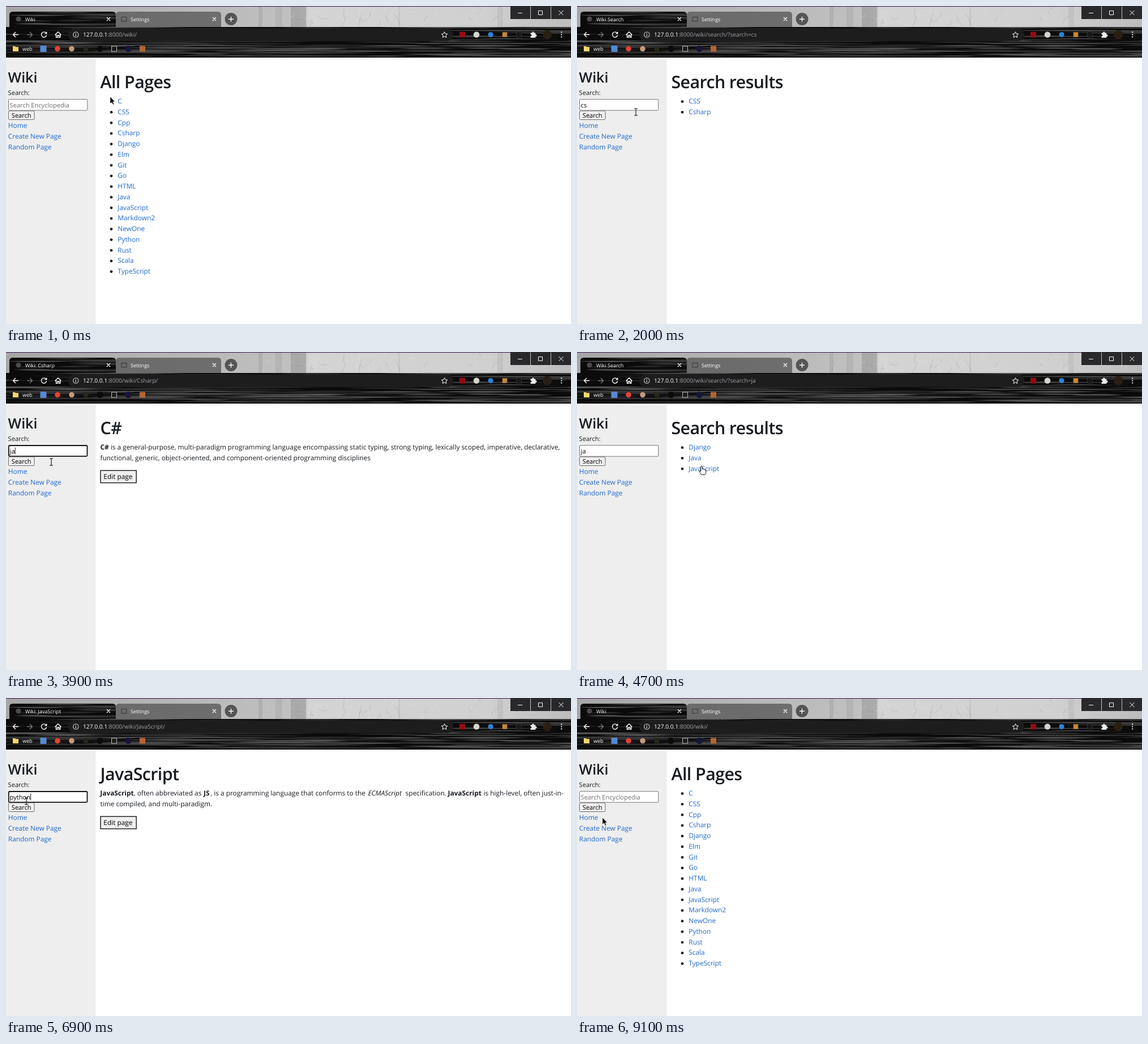
Write an HTML page that moves like this. It is 998 px wide and 561 px high and loops after 9200 ms.

```html
<!DOCTYPE html>
<html lang="en">
<head>
<meta charset="utf-8">
<title>Wiki</title>
<style>
  html, body { margin: 0; width: 100%; height: 100%; overflow: hidden; background: #fff; }
  svg { display: block; }
  text { font-family: "Open Sans", "Noto Sans", sans-serif; font-size: 11.88px; fill: #171b20; white-space: pre; text-rendering: geometricPrecision; }
  .h1 { font-size: 30.4px; font-weight: 600; letter-spacing: -.6px; }
  .h2 { font-size: 25px; font-weight: 600; }
  .small { font-size: 11.1px; }
  .tab { font-size: 9px; fill: #fff; }
  .url { font-size: 10.2px; fill: #9da0a4; }
  .link { fill: #1f68d0; }
  .b { font-weight: 700; }
  .i { font-style: italic; }
  .line { fill: none; stroke: #fff; stroke-width: 1.4; }
</style>
</head>
<body>
<svg id="stage" width="998" height="561" viewBox="0 0 998 561">
  <defs>
    <linearGradient id="fog">
      <stop offset="0" stop-color="#a6a6a6"/>
      <stop offset=".37" stop-color="#bababa"/>
      <stop offset=".5" stop-color="#c0c0c0"/>
      <stop offset=".53" stop-color="#c4c4c4"/>
      <stop offset=".535" stop-color="#d4d4d4"/>
      <stop offset=".85" stop-color="#d0d0d0"/>
      <stop offset="1" stop-color="#bcbcbc"/>
    </linearGradient>
    <clipPath id="dark"><path d="M0 37H6V16Q6 10 12 10H188Q194 10 194 16V37H998V91H0Z"/></clipPath>
    <clipPath id="strip"><rect width="998" height="37"/></clipPath>
  </defs>

  <rect width="998" height="561" fill="#fff"/>
  <rect y="94" width="158.5" height="467" fill="#eee"/>

  <rect width="998" height="37" fill="url(#fog)"/>
  <g id="trees" clip-path="url(#strip)"></g>
  <rect width="998" height="1.2" fill="#50305f"/>
  <path d="M194 37V16Q194 10 200 10H374Q380 10 380 16V37Z" fill="#4a4a4a" opacity=".68"/>
  <g clip-path="url(#dark)">
    <rect width="998" height="91" fill="#0b0b0b"/>
    <g id="grain"></g>
    <rect y="89.5" width="998" height="1.5" fill="#050505"/>
  </g>
  <rect x="110" y="39.5" width="680" height="22.5" rx="11.2" fill="#1d1d1e"/>

  <circle cx="22" cy="23" r="4.6" fill="#4a4a4a"/>
  <rect x="204" y="19.5" width="9" height="7.5" fill="none" stroke="#383838"/>
  <text id="title" class="tab" x="34" y="26.6"></text>
  <text class="tab" x="220" y="26.6">Settings</text>
  <path class="line" d="M178 20l6 6m0-6l-6 6M365 20l6 6m0-6l-6 6"/>
  <circle cx="397.5" cy="23" r="11" fill="#555"/>
  <path class="line" d="M393 23.2h9M397.5 18.7v9"/>

  <g id="winButtons"></g>
  <path class="line" d="M904 12.5h8M940.5 8.5h7v7h-7ZM976.5 8l8 8m0-8l-8 8" style="stroke-width:1"/>

  <path class="line" d="M22 50.5H13M17 46l-4.5 4.5L17 55"/>
  <path class="line" d="M37 50.5h9M42 46l4.5 4.5L42 55" style="stroke:#777"/>
  <path class="line" d="M71 48A4.6 4.6 0 1 0 71.6 51.5M71.7 45.5V48.6H68.5"/>
  <path class="line" d="M86.5 51L92 45.8 97.5 51M88.500 50V55.3H91V51.7H93.5V55.3H95.7V50"/>
  <circle cx="123.3" cy="50.5" r="4.7" class="line" style="stroke-width:1.1;stroke:#ccc"/>
  <path class="line" d="M123.3 49.8v3.4M123.3 47.6v1.2" style="stroke:#ccc"/>
  <text class="url" x="136" y="54.3"><tspan fill="#fff">127.0.0.1</tspan><tspan id="path"></tspan></text>
  <path class="line" d="M774.5 45.5l1.6 3.4 3.7.4-2.8 2.5.8 3.7-3.3-1.9-3.3 1.9.8-3.7-2.8-2.5 3.7-.4Z" style="stroke-width:1"/>
  <g id="icons"></g>
  <path d="M926.5 47.5h2.8a1.7 1.7 0 1 1 3.2 0h2.8v2.9a1.7 1.7 0 1 1 0 3.2v2.4h-8.8v-2.8a1.5 1.5 0 1 0 0-2.9Z" fill="#eee"/>
  <path d="M980.2 45.2h2v2h-2Zm0 4.2h2v2h-2Zm0 4.2h2v2h-2Z" fill="#eee"/>
  <path d="M12 71h4l1 1.200h5V80H12Z" fill="#f5d76c"/>
  <text class="tab" x="29" y="78.8">web</text>

  <text class="h2" x="3.5" y="135">Wiki</text>
  <text class="small" x="3.6" y="156.5">Search:</text>
  <rect id="box" rx="1.5" fill="#fff"/>
  <text id="query" class="small" x="6.6" y="178.7"></text>
  <path id="caret" d="M0 168.5v12" stroke="#000" stroke-width=".9"/>
  <rect x="4.4" y="185" width="45.6" height="15.5" rx="2" fill="#efefef" stroke="#6b6b6b"/>
  <text class="small" x="9.8" y="197" style="fill:#000">Search</text>
  <text class="link" x="3.8" y="215.1">Home</text>
  <text class="link" x="3.8" y="233.9">Create New Page</text>
  <text class="link" x="3.8" y="252.7">Random Page</text>

  <g id="page"></g>

  <g id="cursor">
    <path d="M0 0V12L2.8 9.5 4.8 14 6.7 13.2 4.8 8.8H8.4Z" fill="#000" stroke="#fff" stroke-width=".5"/>
    <path d="M-3-6H-.7L0-5.3.7-6H3M0-5.3V5.3M-3 6H-.7L0 5.3.7 6H3" fill="none" stroke="#111" stroke-width="1.1"/>
    <path d="M-1.3 1Q0-.6 1.3 1V5.5Q2.8 4.6 3.5 6 5 5.2 5.8 6.7 7.5 6.2 7.7 8V11.5Q7.5 13.5 6 15.5H-.3Q-1.5 13-3.8 10.3-4.5 8.7-3 8.7-2 9-1.3 10Z" fill="#fff" stroke="#111"/>
  </g>
</svg>

<script>
const LOOP = 9200, STEP = 100, ROW = 18.75;
const $ = id => document.getElementById(id);

function add(parent, tag, attrs, text) {
  const el = document.createElementNS("http://www.w3.org/2000/svg", tag);
  for (const key in attrs) el.setAttribute(key, attrs[key]);
  if (text) el.textContent = text;
  parent.appendChild(el);
  return el;
}

function seeded(seed) {
  return () => (seed = (seed * 16807) % 2147483647) / 2147483647;
}

function drawTrees() {
  const rnd = seeded(77), g = $("trees");
  for (const [x, w, shade] of [[446, 7, .1], [476, 12, .08], [503, 27, .17], [693, 3, .07], [868, 10, .07]])
    add(g, "path", { d: `M${x} 0h${w}v37h${-w}Z`, fill: "#333", opacity: shade });
  for (let i = 0; i < 45; i++) {
    const x = 400 + rnd() * 490, y = rnd() * 30;
    add(g, "path", {
      d: `M${x} ${y}q${rnd() * 14 - 7} ${rnd() * 8} ${rnd() * 30 - 15} ${rnd() * 24}`,
      fill: "none", stroke: rnd() < .5 ? "#777" : "#f2f2f2", "stroke-width": .7, opacity: .35
    });
  }
}

function drawGrain() {
  const rnd = seeded(4211), g = $("grain");
  for (let i = 0; i < 170; i++) {
    const y = i < 20 ? 11 + rnd() * 27 : i < 60 ? 37 + rnd() * 25 : 61 + rnd() * 29;
    const x = i < 20 ? rnd() * 180 : rnd() * 1100 - 100;
    const w = 60 + rnd() * 240, h = .8 + rnd() * 2, bend = rnd() * 4 - 2;
    const shade = 35 + Math.floor(rnd() * 65);
    add(g, "path", {
      d: `M${x} ${y}q${w / 2} ${bend - h} ${w} 0q${-w / 2} ${bend + h} ${-w} 0Z`,
      fill: `rgb(${shade},${shade},${shade})`
    });
  }
}

function drawIcons() {
  const g = $("icons");
  const dot = (cx, cy, r, fill) => add(g, "circle", { cx, cy, r, fill });
  const square = (cx, cy, s, fill, stroke = "none") =>
    add(g, "rect", { x: cx - s / 2, y: cy - s / 2, width: s, height: s, fill, stroke });
  square(806, 50.5, 10, "#930c12");
  dot(831, 50.5, 5.3, "#d5d5d0");
  dot(856, 50.5, 4.6, "#2c83d9");
  square(881, 50.5, 8.5, "#c38a32");
  square(906, 50.5, 9, "#171717", "#333");
  dot(956, 50.5, 8, "#292013");
  square(66, 75.5, 11, "#5688d5");
  dot(91, 75.5, 4.8, "#e34136");
  dot(116, 75.5, 4.8, "#c59a78");
  square(141, 75.5, 8, "#25291c");
  dot(166, 75.5, 5.6, "#0a0a0a");
  square(191, 75.5, 9, "#1b1b1b", "#bbb");
  dot(216, 75.5, 5.8, "#161637");
  square(241, 75.5, 10, "#b46531");
  for (const x of [891, 927, 963])
    add($("winButtons"), "rect", { x, y: 0, width: 35, height: 23, fill: "#29292b" });
}

// Runs are [x, line, text, class].
const list = (title, path, items) => ({ title, path, head: title === "Wiki" ? "All Pages" : "Search results", items });
const article = (name, head, lines, runs) => ({ title: "Wiki: " + name, path: name + "/", head, lines, runs });
const pages = {
  home: list("Wiki", "", "C CSS Cpp Csharp Django Elm Git Go HTML Java JavaScript Markdown2 NewOne Python Rust Scala TypeScript".split(" ")),
  cs: list("Wiki Search", "search/?search=cs", ["CSS", "Csharp"]),
  ja: list("Wiki Search", "search/?search=ja", ["Django", "Java", "JavaScript"]),
  csharp: article("Csharp", "C#", 2, [
    [166.5, 0, "C#", "b"],
    [184.7, 0, "is a general-purpose, multi-paradigm programming language encompassing static typing, strong typing, lexically scoped, imperative, declarative,"],
    [166.5, 1, "functional, generic, object-oriented, and component-oriented programming disciplines"]]),
  js: article("JavaScript", "JavaScript", 2, [
    [166.3, 0, "JavaScript", "b"],
    [225.7, 0, ", often abbreviated as"],
    [349, 0, "JS", "b"],
    [361.3, 0, ", is a programming language that conforms to the"],
    [639.5, 0, "ECMAScript", "i"],
    [705.5, 0, "specification."],
    [780.5, 0, "JavaScript", "b"],
    [843.5, 0, "is high-level, often just-in-"],
    [166.5, 1, "time compiled, and multi-paradigm."]]),
  python: article("Python", "Python", 1, [
    [166.3, 0, "Python is a programming language that can be used both for writing"],
    [548.7, 0, "command-line scripts", "b"],
    [678.7, 0, "or building"],
    [742.7, 0, "web applications", "b"],
    [842, 0, "."]])
};

const visits = [[0, "home"], [1500, "cs"], [2800, "csharp"], [4300, "ja"], [5300, "js"], [7100, "python"], [8900, "home"]];
// Input states: [time, value, focused]
const inputs = [[0, "", 0], [700, "", 1], [1000, "c", 1], [1200, "cs", 1], [1500, "cs", 0], [2800, "", 0],
  [3500, "", 1], [3700, "j", 1], [3800, "ja", 1], [4300, "ja", 0], [5300, "", 0], [6000, "", 1],
  [6300, "p", 1], [6400, "py", 1], [6500, "pyt", 1], [6600, "pyth", 1], [6700, "pytho", 1], [6800, "python", 1], [7100, "", 0]];
const ARROW = 0, BEAM = 1, HAND = 2;
const moves = [[0, 184, 160, ARROW], [400, 120, 172, BEAM], [700, 90, 176, BEAM], [1500, 90, 176, BEAM],
  [2000, 104, 187, BEAM], [2200, 150, 190, ARROW], [2500, 208, 186, HAND], [2800, 212, 187, BEAM],
  [3000, 200, 188, BEAM], [3200, 140, 182, BEAM], [3500, 80, 178, BEAM], [3900, 80, 194, BEAM],
  [4100, 80, 194, BEAM], [4300, 120, 198, ARROW], [4500, 205, 202, HAND], [4700, 220, 201, HAND],
  [5000, 222, 200, HAND], [5100, 224, 199, HAND], [5200, 224, 199, HAND], [5300, 222, 196, ARROW],
  [5700, 110, 180, BEAM], [6000, 36, 180, BEAM], [6100, 36, 182, BEAM], [7200, 36, 182, BEAM],
  [7400, 150, 180, ARROW], [7500, 190, 178, BEAM], [7800, 259, 178, BEAM], [8200, 240, 182, ARROW],
  [8600, 28, 210, HAND], [8900, 30, 211, ARROW], [9100, 45, 211, ARROW]];

const indexAt = (track, t) => track.reduce((found, key, i) => key[0] <= t ? i : found, 0);
const ease = u => u * u * (3 - 2 * u);

function cursorAt(t) {
  const i = indexAt(moves, t), a = moves[i], b = moves[i + 1] || a;
  const u = b === a ? 0 : ease((t - a[0]) / (b[0] - a[0]));
  return { x: a[1] + (b[1] - a[1]) * u, y: a[2] + (b[2] - a[2]) * u, kind: a[3] };
}

let shown;
function showPage(name) {
  if (name === shown) return;
  shown = name;
  const p = pages[name], g = $("page");
  g.replaceChildren();
  $("title").textContent = p.title;
  $("path").textContent = ":8000/wiki/" + p.path;
  add(g, "text", { x: 166.5, y: 145, class: "h1" }, p.head);
  if (p.items) p.items.forEach((item, i) => {
    add(g, "circle", { cx: 186, cy: 168.6 + i * ROW, r: 2.4, fill: "#171b20" });
    add(g, "text", { x: 197.3, y: 172 + i * ROW, class: "link" }, item);
  });
  else {
    for (const [x, line, text, style = ""] of p.runs)
      add(g, "text", { x, y: 172 + line * ROW, class: style }, text);
    const y = 171.5 + p.lines * ROW;
    add(g, "rect", { x: 167, y, width: 63.2, height: 21.7, fill: "#efefef", stroke: "#222", "stroke-width": 1.5 });
    add(g, "text", { x: 172.3, y: y + 15.2, style: "fill:#000" }, "Edit page");
  }
}

function setInput(value, focused) {
  const box = $("box"), query = $("query"), caret = $("caret");
  const inset = focused ? 4.8 : 4.5;
  const attrs = { x: inset, y: inset + 160.2, width: 148.3 - 2 * inset, height: 28.4 - 2 * inset,
    stroke: focused ? "#101010" : "#767676", "stroke-width": focused ? 1.8 : 1 };
  for (const key in attrs) box.setAttribute(key, attrs[key]);
  query.textContent = value || "Search Encyclopedia";
  query.style.fill = value ? "#000" : "#6c6c6c";
  caret.style.display = focused ? "" : "none";
  const end = value ? query.getComputedTextLength() : 0;
  caret.setAttribute("transform", `translate(${7.2 + end} 0)`);
}

function draw(time) {
  const t = Math.floor((time % LOOP) / STEP) * STEP;
  showPage(visits[indexAt(visits, t)][1]);
  const [, value, focused] = inputs[indexAt(inputs, t)];
  setInput(value, focused);
  const c = cursorAt(t);
  $("cursor").setAttribute("transform", `translate(${c.x} ${c.y})`);
  [...$("cursor").children].forEach((shape, i) => shape.style.display = i === c.kind ? "" : "none");
}

drawTrees();
drawGrain();
drawIcons();
const start = performance.now();
function tick() {
  draw(performance.now() - start);
  requestAnimationFrame(tick);
}
tick();
</script>
</body>
</html>
```
